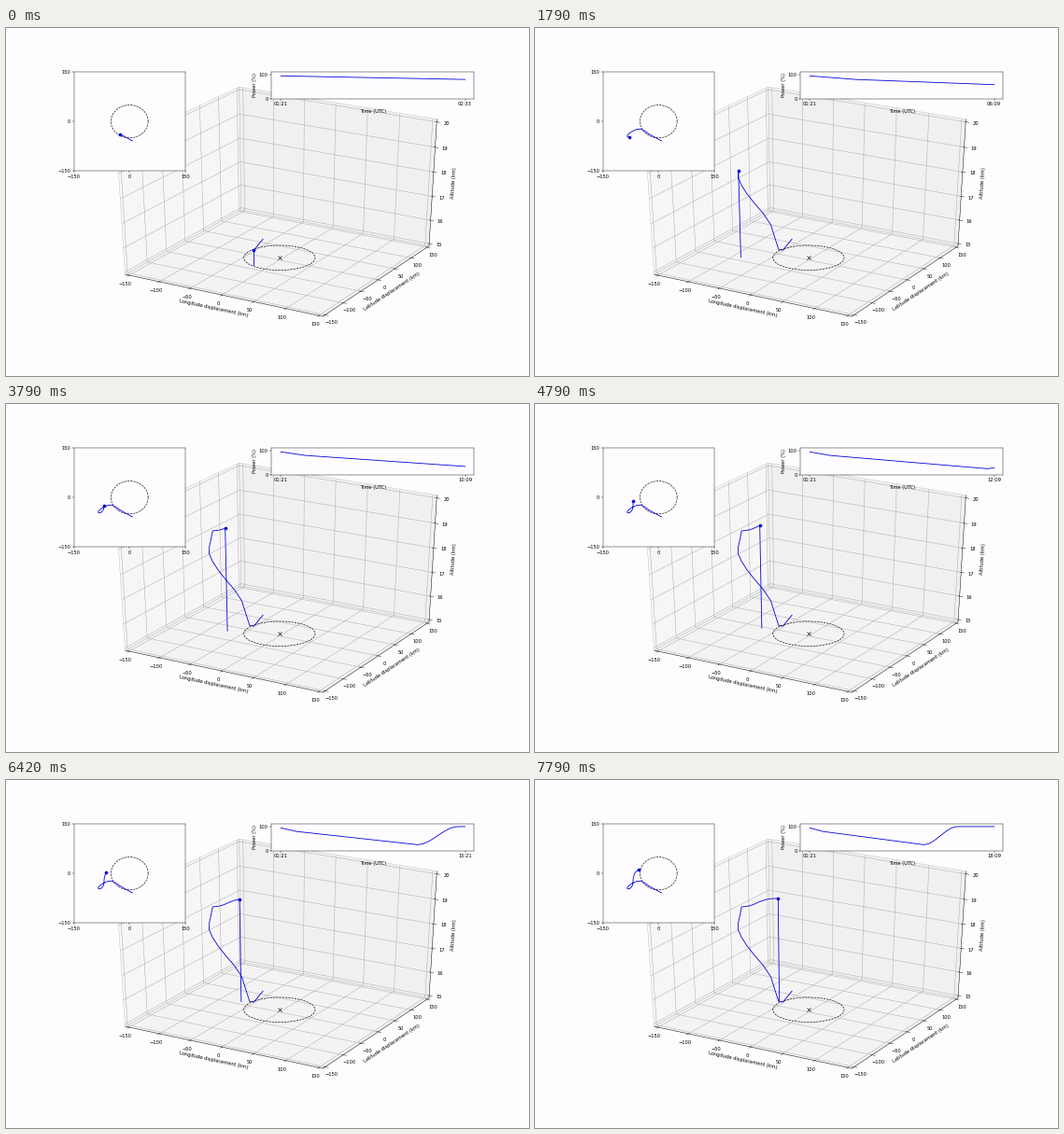
These frames come from a looping animation (560x373 px, 8 s). A matplotlib script:

```python
import numpy as np
import matplotlib.pyplot as plt
from matplotlib.animation import FuncAnimation
from matplotlib.collections import LineCollection
from matplotlib.patches import Polygon

W, H = 560, 373
DPI = 112 / 3
INTERVAL, LOOP = 40, 8000
STEP_STARTS = np.array([0, 210, 420, 580, 790])  # repeats every second

PAPER, BLUE = "#fefcfe", "#0000dc"
LINE = dict(color=BLUE, lw=1.6)
DOT = dict(color=BLUE, marker="o", ms=6, ls="")
DASH = dict(color="k", ls="--", lw=1.2)

plt.rcParams.update({"font.family": "DejaVu Sans", "font.size": 10,
                     "axes.facecolor": PAPER})


def spline(t, keys, values):
    """Smooth curve through a few key points (cubic Hermite)."""
    keys, values = np.asarray(keys, float), np.asarray(values, float)
    slopes = np.gradient(values, keys)
    t = np.clip(t, keys[0], keys[-1])
    k = np.clip(np.searchsorted(keys, t, "right") - 1, 0, len(keys) - 2)
    span = keys[k + 1] - keys[k]
    s = (t - keys[k]) / span
    ease = s * s * (3 - 2 * s)
    return (values[k] + (values[k + 1] - values[k]) * ease
            + span * s * (1 - s) * ((1 - s) * slopes[k] - s * slopes[k + 1]))


# One sample every 24 minutes: drift in km, altitude in km, charge in percent
samples = np.arange(43)
turns = [0, 3, 5, 8, 10, 12, 15, 27, 35, 42]
lon = spline(samples, turns, [8, -26, -47, -77.5, -84.5, -79.5, -73.5, -67.5, -62.5, -52.5])
lat = spline(samples, turns, [-59, -38, -23, -35, -45, -47, -42, -12, 3, 12])
alt = spline(samples, [0, 3, 5, 8, 13], [16.35, 15.56, 16.34, 17.58, 19.22])
drain = np.interp(samples, [0, 3, 26], [94.5, 79.5, 24])
charge = np.clip((samples - 26) / 7.6, 0, 1)
power = drain + (100 - drain) * charge ** 2 * (3 - 2 * charge)

# The 3D view fills this rectangle
LEFT, RIGHT, TOP, BOTTOM = 0.125 * W, 0.9 * W, 0.12 * H, 0.875 * H
KX, KY = (RIGHT - LEFT) / 0.185, (BOTTOM - TOP) / 0.185
CX, CY = LEFT + 0.095 * KX, BOTTOM - 0.095 * KY
AZIM, ELEV = np.radians(-60), np.radians(30)
EDGE = 0.5 + 1 / 48
DELTA = 1 / 12


def project(u, v, w):
    """Unit-cube coordinates, centred on zero, to stage pixels."""
    ca, sa, ce, se = np.cos(AZIM), np.sin(AZIM), np.cos(ELEV), np.sin(ELEV)
    depth = 10 - (ce * (u * ca + v * sa) + w * se)
    across = -u * sa + v * ca
    up = -se * (u * ca + v * sa) + w * ce
    return CX + KX * across / depth, CY - KY * up / depth


def place(x, y, z):
    return project(np.asarray(x) / 300, np.asarray(y) / 300,
                   (np.asarray(z) - 17.5) / 5)


def segment(*points):
    return [project(*p) for p in points]


def pixel_axes(x0, x1, y0, y1):
    return fig.add_axes([x0 / W, 1 - y1 / H, (x1 - x0) / W, (y1 - y0) / H])


fig = plt.figure(figsize=(W / DPI, H / DPI), dpi=DPI, facecolor=PAPER)
view = fig.add_axes([0, 0, 1, 1])
view.set(xlim=(0, W), ylim=(H, 0))
view.axis("off")


def draw_pane(axis, side, tone):
    """Wall of the cube at the given side of one axis."""
    a, b = (i for i in range(3) if i != axis)
    corners = np.full((4, 3), side * EDGE)
    corners[:, a] = EDGE * np.array([-1, 1, 1, -1])
    corners[:, b] = EDGE * np.array([-1, -1, 1, 1])
    view.add_patch(Polygon(segment(*corners), fc=(tone,) * 3 + (0.5,),
                           ec="0.74", lw=0.8, zorder=1))


def draw_axis(index, ends, ticks, labels, title):
    """One axis line with its grid, ticks, tick labels and title."""
    back = np.array([-EDGE, EDGE, -EDGE])
    start, stop = (np.array(p) for p in ends)
    tick_dir = 1 if index == 0 else 0
    others = [i for i in range(3) if i != index]
    out = np.sign(start)
    out[index] = 0

    grid, marks = [], []
    for tick, label in zip(ticks, labels):
        corner = back.copy()
        corner[index] = tick
        arms = []
        for i in others:
            arm = corner.copy()
            arm[i] = -arm[i]
            arms.append(arm)
        grid.append(segment(arms[0], corner, arms[1]))

        pos = start.copy()
        pos[index] = tick
        shift = np.zeros(3)
        shift[tick_dir] = out[tick_dir] * DELTA
        marks.append(segment(pos - 0.1 * shift, pos + 0.2 * shift))
        tx, ty = project(*(pos + out * 0.4 * DELTA))
        view.text(tx, ty, label, ha="center", va="top")

    view.add_collection(LineCollection(grid, colors="#b0b0b0", linewidths=1, zorder=2))
    view.add_collection(LineCollection(marks, colors="k", linewidths=0.8, zorder=3))
    (x0, y0), (x1, y1) = segment(start, stop)
    view.plot([x0, x1], [y0, y1], "k", lw=0.8, zorder=3)
    angle = np.degrees(np.arctan2(y0 - y1, x1 - x0))
    tx, ty = project(*((start + stop) / 2 + out * 0.869 * DELTA))
    view.text(tx, ty, title, rotation=angle, ha="center", va="center")


draw_pane(0, -1, 0.95)
draw_pane(1, 1, 0.90)
draw_pane(2, -1, 0.925)

e = EDGE
km = np.arange(-150, 151, 50)
km_labels = [str(k).replace("-", "\u2212") for k in km]
draw_axis(0, [(-e, -e, -e), (e, -e, -e)], km / 300, km_labels,
          "Longitude displacement (km)")
draw_axis(1, [(e, -e, -e), (e, e, -e)], km / 300, km_labels,
          "Latitude displacement (km)")
draw_axis(2, [(e, e, -e), (e, e, e)], np.arange(6) / 5 - 0.5, range(15, 21),
          "Altitude (km)")

theta = np.linspace(0, 2 * np.pi, 100)
ring = 50 * np.cos(theta), 50 * np.sin(theta)
view.plot(*place(*ring, 15), **DASH, zorder=4)
view.plot(*place(0, 0, 15), "kx", ms=9, mew=1.2, zorder=4)
trail, = view.plot([], [], **LINE, zorder=5)
stem, = view.plot([], [], **LINE, zorder=5)
head, = view.plot([], [], **DOT, zorder=6)

# Plan view, top left
PAD = 5 * DPI / 72
width, height = RIGHT - LEFT, BOTTOM - TOP
plan = pixel_axes(LEFT + PAD, LEFT + PAD + 0.275 * width,
                  TOP + PAD, TOP + PAD + 0.375 * height)
plan.set(xlim=(-150, 150), ylim=(-150, 150),
         xticks=[-150, 0, 150], yticks=[-150, 0, 150])
plan.plot(*ring, **DASH)
plan_trail, = plan.plot([], [], **LINE)
plan_head, = plan.plot([], [], **DOT)

# Power chart, top right
chart = pixel_axes(RIGHT - PAD - 0.5 * width, RIGHT - PAD,
                   TOP + PAD, TOP + PAD + 0.1 * height)
chart.set(ylim=(0, 110), yticks=[0, 100], ylabel="Power (%)")
chart.set_xlabel("Time (UTC)", labelpad=5)
power_line, = chart.plot([], [], **LINE)


def clock(sample):
    minutes = 81 + 24 * sample
    return f"{minutes // 60:02d}:{minutes % 60:02d}"


def update(i):
    second, ms = divmod(i * INTERVAL, 1000)
    step = 5 * second + np.count_nonzero(ms + 30 >= STEP_STARTS) - 1
    n = step + 3

    # The 3D view runs one sample behind the plan view
    px, py = place(lon[:n], lat[:n], alt[:n])
    foot = place(lon[n - 1], lat[n - 1], 15)
    trail.set_data(px, py)
    head.set_data(px[-1:], py[-1:])
    stem.set_data([px[-1], foot[0]], [py[-1], foot[1]])

    plan_trail.set_data(lon[:n + 1], lat[:n + 1])
    plan_head.set_data(lon[n:n + 1], lat[n:n + 1])

    power_line.set_data(samples[:n + 1], power[:n + 1])
    chart.set_xlim(-0.05 * n, 1.05 * n)
    chart.set_xticks([0, n], [clock(0), clock(n)])
    return trail, head, stem, plan_trail, plan_head, power_line


anim = FuncAnimation(fig, update, frames=LOOP // INTERVAL, interval=INTERVAL,
                     repeat=True, repeat_delay=0, blit=False)
plt.show()
```
